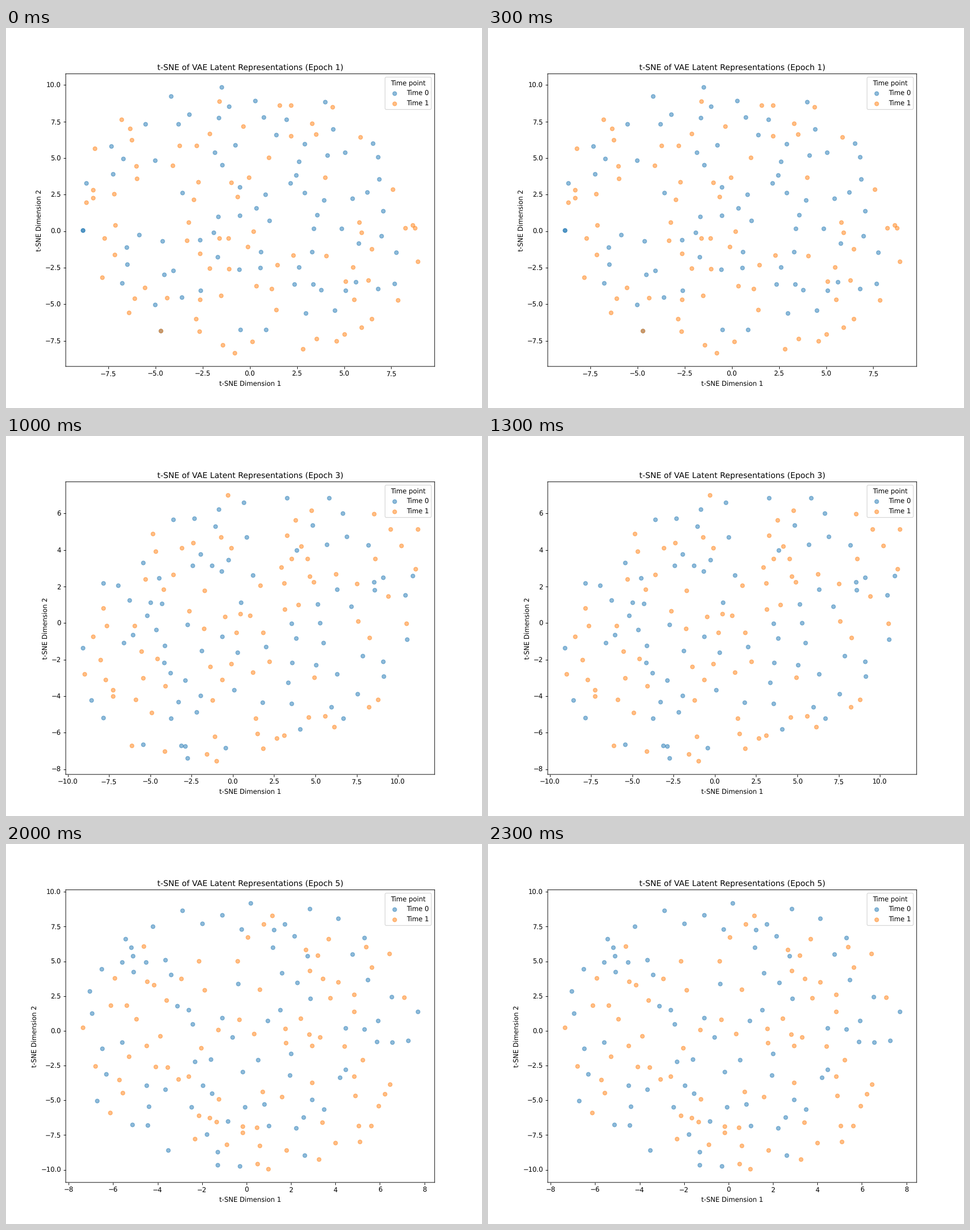
Write a matplotlib script that moves like this. It is 837 by 669 pixels and loops after 2500 ms.

```python
import numpy as np
import matplotlib.pyplot as plt
from matplotlib.animation import FuncAnimation
from matplotlib.path import Path

COUNT = 80                  # samples per time point
TRIES = 3                   # candidates per sample: higher spreads more evenly
ASPECT = np.array([1.26, 1])  # width and height of the data area

# Soft, unsnapped lines and text
plt.rcParams.update({"path.snap": False, "text.hinting": "none"})


def outline(skew):
    """Rounded loop touching all sides of the unit box, leaning by skew."""
    t = np.linspace(0, 2 * np.pi, 120)
    loop = np.column_stack([np.cos(t), np.sin(t + skew)])
    return Path(np.sign(loop) * np.abs(loop) ** 0.85)


def cloud(time0, time1, skew, seed):
    """Fill a cloud evenly around key points, which also set its extent."""
    rng = np.random.default_rng(seed)
    keys = np.array(time0 + time1)
    low, high = keys.min(axis=0), keys.max(axis=0)
    center, half = (low + high) / 2, (high - low) / 2
    area = outline(skew)

    groups = [[(np.array(p) - center) / half for p in g] for g in (time0, time1)]
    while min(map(len, groups)) < COUNT:
        options = rng.uniform(-1, 1, (30, 2))
        options = options[area.contains_points(options)][:TRIES]
        placed = np.array(groups[0] + groups[1])
        gaps = np.linalg.norm((options[:, None] - placed) * ASPECT, axis=2)
        best = options[gaps.min(axis=1).argmax()]
        min(groups, key=len).append(best)
    return [np.array(g) * half + center for g in groups]


epochs = [
    cloud([(-8.87, 0.07), (-8.87, 0.07), (-1.5, 9.86), (-4.73, -6.8)],
          [(8.91, -2.09), (-0.81, -8.35), (-4.73, -6.8)], skew=-0.1, seed=1),
    cloud([(-2.91, 8.75), (-2.91, 8.75), (10.45, -1.39)],
          [(-10.03, 4.93), (5.47, -8.44), (5.47, -8.4)], skew=-0.4, seed=2),
    cloud([(-9.11, -1.37)],
          [(-0.29, 7.0), (-0.98, -7.56), (11.21, 5.13)], skew=0.25, seed=3),
    cloud([(-2.96, 8.87), (-0.25, -9.35), (-2.34, -6.3), (-2.34, -6.33)],
          [(-9.61, 0.05), (-9.53, 0.05), (8.15, 1.44)], skew=0, seed=4),
    cloud([(0.19, 9.19), (7.71, 1.38)],
          [(-7.38, 0.24), (0.98, -9.95)], skew=0, seed=5),
]

fig, ax = plt.subplots(figsize=(10.0001, 7.9931), dpi=83.7)
fig.subplots_adjust(left=0.1255, right=0.9005,
                    bottom=1 - 712.5 / 800, top=1 - 96.5 / 800)


def draw(i):
    ax.clear()
    for t, points in enumerate(epochs[i]):
        ax.scatter(*points.T, color=f"C{t}", alpha=0.5, label=f"Time {t}")
    ax.set(xlabel="t-SNE Dimension 1", ylabel="t-SNE Dimension 2",
           title=f"t-SNE of VAE Latent Representations (Epoch {i + 1})")
    ax.legend(title="Time point", loc="upper right", labelspacing=0.55)
    return ax.get_children()


anim = FuncAnimation(fig, draw, frames=len(epochs), interval=500,
                     repeat=True, repeat_delay=0)
plt.show()
```
